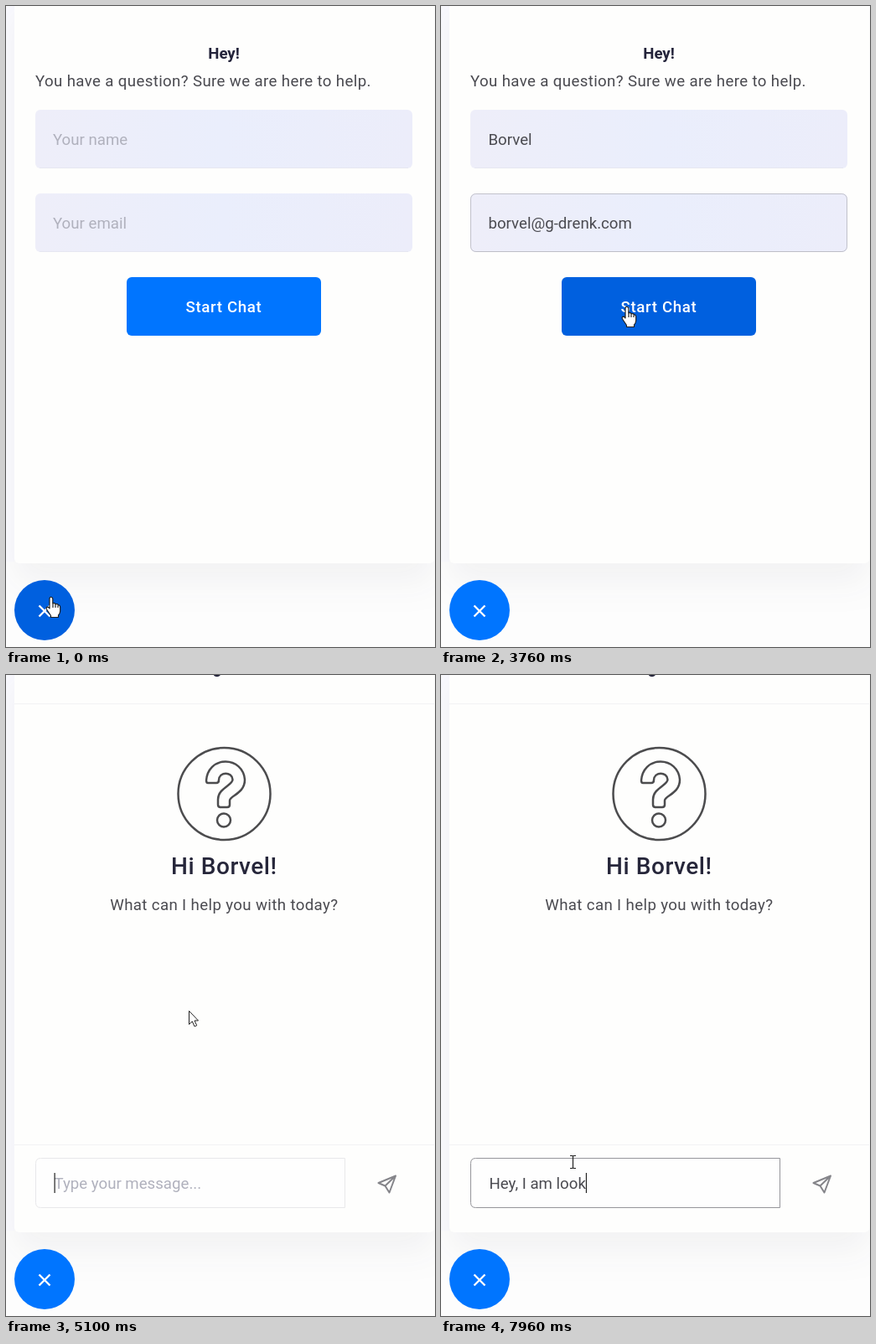
An HTML page that plays this animation: 512x766 px, repeating every 8000 ms.

```html
<!DOCTYPE html>
<html lang="en">
<head>
<meta charset="utf-8">
<title>Chat widget</title>
<style>
  html, body { margin: 0; width: 100%; height: 100%; overflow: hidden; background: #fdfdfd; }
  svg { display: block; width: 512px; height: 766px; }
  text { font: 18.67px Roboto, sans-serif; fill: #4a4a50; white-space: pre; }
  .mid { text-anchor: middle; }
  .wide { letter-spacing: .02em; }
  .hint { fill: #b0b1bd; }
  .hey { font-weight: 700; fill: #23233a; }
  .hi { font-size: 28px; font-weight: 500; fill: #26263a; }
  .go { font-weight: 500; letter-spacing: .67px; fill: #fff; }
  .status { font: 14px "Open Sans", sans-serif; fill: #4d5156; }
  .panel { fill: #fefefd; filter: drop-shadow(0 24px 20px rgba(30, 30, 50, .05)); }
  .caret { fill: #222; }
  .line { fill: none; stroke: #4c4c4e; stroke-width: 2.5; }
  .rule { stroke: #f2f2f4; }
</style>
</head>
<body>
<svg viewBox="0 0 512 766">
  <defs>
    <linearGradient id="tint">
      <stop offset="0" stop-color="#eeeef9"/>
      <stop offset=".5" stop-color="#eaeefc"/>
      <stop offset="1" stop-color="#ecedfa"/>
    </linearGradient>
  </defs>
  <rect width="10" height="664" fill="#fafafe"/>
  <rect class="panel" x="10" y="-20" width="501.5" height="686" rx="6"/>

  <g id="form">
    <text class="hey mid" x="260" y="63">Hey!</text>
    <text class="wide" x="35" y="96">You have a question? Sure we are here to help.</text>
    <g id="name"></g>
    <g id="email"></g>
    <rect id="start" y="324" height="70" rx="6"/>
    <g id="spinner" fill="none" stroke="#fff" stroke-width="4">
      <path d="M-4-7.5A8.5 8.5 0 1 1-8.4 1"/>
      <path d="M-12.5 1.5L-8.5-5L-3 1.5Z" fill="#fff" stroke="none"/>
    </g>
    <text class="go mid" id="startText" y="366">Start Chat</text>
  </g>

  <g id="chat">
    <text class="hey mid" x="252" y="-2">g</text>
    <path class="rule" d="M10 34.5H511M10 561.5H511"/>
    <g class="line">
      <circle cx="260.5" cy="142" r="55"/>
      <circle cx="260" cy="173.5" r="8"/>
      <path d="M241 129H251Q254 129 254 125.5C254.5 115 270 115.5 270.5 125C270.5 132 253 135 253 149V155Q253 158 256 158H264Q267 158 267 155V150C267 144 285 142 285 125C284 112 274 103.5 262 103.5C249 103.5 240 113 239 126Q239 129 241 129Z"/>
    </g>
    <text class="hi mid wide" x="260.3" y="238">Hi Borvel!</text>
    <text class="wide mid" x="260.3" y="281">What can I help you with today?</text>
    <path id="box" d="M404.5 577.5V636.5H41.5Q35.5 636.5 35.5 630.5V583.5Q35.5 577.5 41.5 577.5Z" fill="#fefefe"/>
    <text class="hint" id="ask" x="57.5" y="614">Type your message...</text>
    <text id="message" x="57.5" y="614"></text>
    <rect class="caret" id="messageCaret" y="595" width="1.2" height="24"/>
    <path d="M465 598.5L444.5 607L452.5 610.5L457.5 618.5ZM465 598.5L452.5 610.5" fill="none" stroke="#85858a" stroke-width="2" stroke-linejoin="round"/>
  </g>

  <circle id="toggle" cx="46" cy="722" r="36"/>
  <path d="M39.5 716.5L52.5 729.5M52.5 716.5L39.5 729.5" stroke="#fff" stroke-width="2.4"/>

  <g id="status">
    <rect y="738" width="512" height="28" fill="#dae0e5"/>
    <text class="status" x="6" y="758">Waiting for hub-k4.plurna.com...</text>
  </g>

  <g id="pointer" stroke-linejoin="round">
    <path id="arrow" d="M.5.5V16.5L4.3 13L7 19L9.7 17.8L7 12H11.5Z" fill="#fff" stroke="#222"/>
    <path id="hand" d="M-2 2Q-1.5 0 0 .3Q1.7.6 1.8 2.5V8Q4.2 6.8 5 9Q7.5 7.8 8.2 10Q10.5 9.4 10.7 12.5V17Q10.5 20 8.5 22V24.5H-.5V22.5L-5.5 15Q-6.5 12.5-4.5 12.2Q-3 12.3-2 14ZM2 8V13M5 9.5V13M8 10.5V13" fill="#fff" stroke="#222" stroke-width="1.2"/>
    <path id="beam" d="M-3.5-7.5H-1L0-7L1-7.5H3.5M0-7V7M-3.5 7.5H-1L0 7L1 7.5H3.5" fill="none" stroke="#222" stroke-width="1.2"/>
  </g>
</svg>
<script>
const LOOP = 8000, BLINK = 235;
const TAB = 1590, CLICK = 3690, LOAD = 3800, CHAT = 4760;
const $ = id => document.getElementById(id);
const set = (el, attrs) => { for (const a in attrs) el.setAttribute(a, attrs[a]); };
const show = (el, on) => set(el, { opacity: +on });
const ramp = (t, from, to) => Math.min(1, Math.max(0, (t - from) / (to - from)));
const pulse = (t, on, off, fade) => ramp(t, on, on + fade) - ramp(t, off, off + fade);
const mix = (a, b, k) => `color-mix(in srgb, ${b} ${k * 100}%, ${a})`;
const every = (start, step, n) => Array.from({ length: n }, (_, i) => start + step * i);

const nameKeys = every(1230, 60, 6);
const emailKeys = [...every(1710, 60, 3), ...every(2000, 65, 5), ...every(2430, 75, 5), ...every(2930, 76, 4), 3300];
const messageKeys = [6530, 6700, 6760, 6960, 7100, ...every(7330, 50, 3), ...every(7600, 66, 6)];

const fields = [
  { id: "name", y: 124, hint: "Your name", text: "Borvel", keys: nameKeys, on: 1000, off: TAB },
  { id: "email", y: 224, hint: "Your email", text: "borvel@g-drenk.com", keys: emailKeys, on: TAB, off: CLICK }
];
for (const f of fields) {
  $(f.id).innerHTML = `
    <rect x="35" y="${f.y}" width="450" height="70" rx="6" fill="url(#tint)"/>
    <path d="M40 ${f.y + 69.5}H480" stroke="#e6e7f1"/>
    <rect x="35.5" y="${f.y + .5}" width="449" height="69" rx="6" fill="none" stroke="#95959c"/>
    <text>${f.hint}</text>
    <text x="56.5" y="${f.y + 42}"></text>
    <rect class="caret" y="${f.y + 23}" width="1.2" height="24"/>`;
  [, , f.border, f.label, f.value, f.caret] = $(f.id).children;
}

// Shows the typed part and puts the caret behind it.
function type(t, el, caret, x, text, keys, on, off) {
  const n = keys.filter(k => k <= t).length;
  el.textContent = text.slice(0, n);
  const since = t - (n ? keys[n - 1] : on);
  set(caret, { x: x + (n ? el.getComputedTextLength() : 0) });
  show(caret, t >= on && t < off && Math.floor(since / BLINK) % 2 == 0);
  return n;
}

function drawField(t, f) {
  const n = type(t, f.value, f.caret, 56.5, f.text, f.keys, f.on, f.off);
  const up = ramp(t, f.on, f.on + 110);
  set(f.border, { opacity: pulse(t, f.on, f.off, 140) });
  set(f.label, {
    transform: `translate(${56 + 2 * up} ${f.y + 42 - 22 * up}) scale(${1 - .28 * up})`,
    opacity: n ? 1 - ramp(t, f.off, f.off + 50) : 1
  });
  f.label.style.fill = mix("#b0b1bd", "#55555c", up);
}

const path = [
  [0, 54, 706], [360, 54, 706], [960, 137, 163.5], [3530, 137, 163.5], [3680, 222, 359],
  [3830, 222, 359], [4060, 218, 402], [4400, 218, 402], [4500, 218, 401], [5250, 218, 401],
  [5510, 157.5, 582], [LOOP, 157.5, 582]
];
function pointerAt(t) {
  const i = path.findIndex(p => p[0] > t);
  const [t0, x0, y0] = path[i - 1], [t1, x1, y1] = path[i];
  const k = ramp(t, t0, t1), e = k * k * (3 - 2 * k);
  return [x0 + (x1 - x0) * e, y0 + (y1 - y0) * e];
}
function drawPointer(t) {
  const [x, y] = pointerAt(t);
  const over = (l, top, r, bottom) => x > l && x < r && y > top && y < bottom;
  const hand = Math.hypot(x - 46, y - 722) < 36 || t < LOAD && over(144, 324, 376, 394);
  const beam = t < CHAT
    ? over(35, 124, 485, 194) || over(35, 224, 485, 294)
    : over(35, 577, 405, 637);
  set($("pointer"), { transform: `translate(${x} ${y})` });
  show($("hand"), hand);
  show($("beam"), beam);
  show($("arrow"), !hand && !beam);
}

function drawForm(t) {
  fields.forEach(f => drawField(t, f));
  const loading = t >= LOAD, hover = pulse(t, 3640, LOAD, 80);
  set($("start"), {
    x: loading ? 130 : 144,
    width: loading ? 260 : 232,
    opacity: 1 - .32 * ramp(t, LOAD, LOAD + 120)
  });
  $("start").style.fill = mix("#0075ff", "#0060df", hover);
  set($("startText"), { x: loading ? 274 : 260 });
  set($("spinner"), { transform: `translate(212 359.5) rotate(${(t - 4260) * .36})` });
  show($("spinner"), loading);
}

function drawChat(t) {
  set($("chat"), { opacity: ramp(t, CHAT, CHAT + 200) });
  $("box").style.stroke = mix("#e8e8ea", "#95959a", ramp(t, 5260, 5500));
  const n = type(t, $("message"), $("messageCaret"), 57.5, "Hey, I am look", messageKeys, 4995, LOOP);
  show($("ask"), !n);
}

function draw(t) {
  show($("form"), t < CHAT);
  drawForm(t);
  drawChat(t);
  show($("status"), t >= 4060 && t < CHAT);
  $("toggle").style.fill = mix("#0060df", "#0075ff", ramp(t, 420, 520));
  drawPointer(t);
}

const begin = performance.now();
function tick() {
  draw((performance.now() - begin) % LOOP);
  requestAnimationFrame(tick);
}
tick();
</script>
</body>
</html>
```
